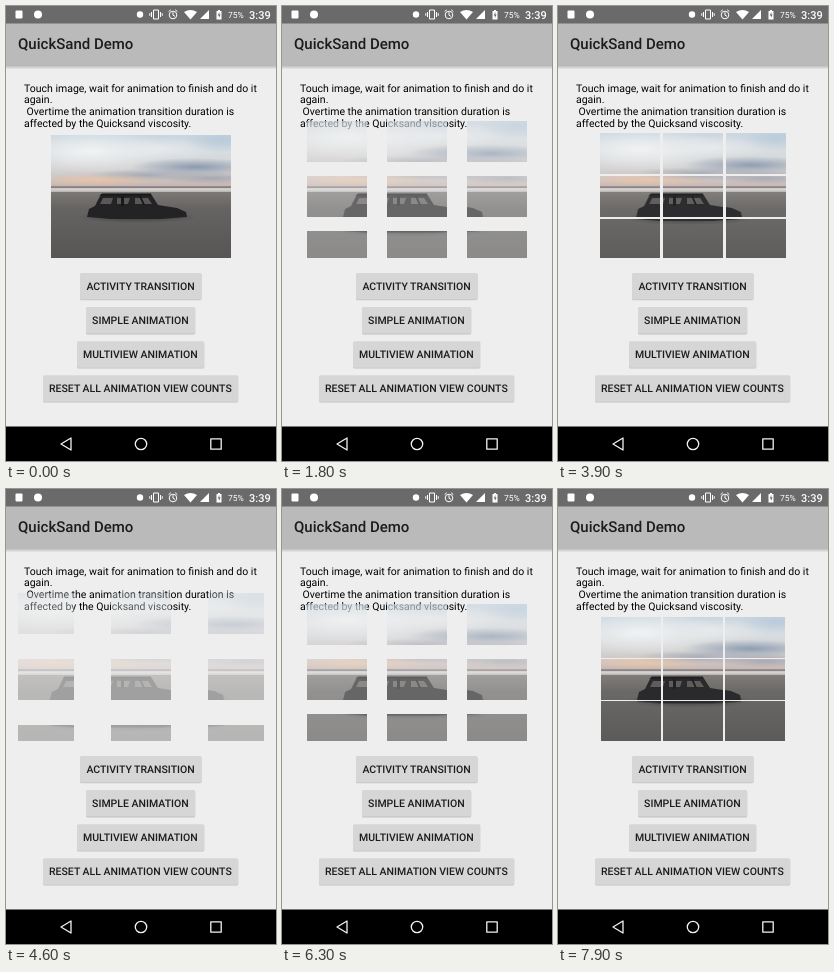
Recreate the animation shown at these times as an HTML page with a canvas. Size 270x455 px, loop 8000 ms.

```html
<!DOCTYPE html>
<html lang="en">
<head>
<meta charset="utf-8">
<title>QuickSand Demo</title>
<style>
html, body { margin: 0; width: 100%; height: 100%; overflow: hidden; background: #eee; }
svg, canvas { position: absolute; display: block; }
svg { left: 0; top: 0; }
canvas { left: 12px; top: 80px; }
text { font-family: Roboto, "Noto Sans", sans-serif; text-rendering: geometricPrecision; }
.title { font-size: 15px; font-weight: 500; fill: #1c1c1c; }
.body { font-size: 10.5px; fill: #000; white-space: pre; }
.btn { font-size: 10.5px; font-weight: 500; fill: #1c1c1c; text-anchor: middle; }
</style>
</head>
<body>
<svg width="270" height="455" viewBox="0 0 270 455">
  <defs>
    <linearGradient id="shade" x1="0" y1="0" x2="0" y2="1">
      <stop offset="0" stop-color="#000" stop-opacity=".25"/>
      <stop offset="1" stop-color="#000" stop-opacity="0"/>
    </linearGradient>
  </defs>
  <rect width="270" height="455" fill="#eee"/>
  <rect y="17" width="270" height="42" fill="#bababa"/>
  <rect y="59" width="270" height="4.500" fill="url(#shade)"/>
  <rect width="270" height="17.500" fill="#6a6a6a"/>

  <g id="status" fill="#fff">
    <rect x="9.500" y="4.500" width="7" height="8" rx="1"/>
    <circle cx="32" cy="8.500" r="4"/>
    <circle cx="134" cy="8.500" r="3.200"/>
    <path d="M147.500 4h5v9h-5z M145.500 6v5 M154.500 6v5 M143.800 7.200v2.600 M156.200 7.200v2.600" fill="none" stroke="#fff"/>
    <path d="M167 6.200v3l2 1.200 M162.600 5.600l2.200-1.900 M171.400 5.600l-2.200-1.900" fill="none" stroke="#fff"/>
    <circle cx="167" cy="9" r="3.800" fill="none" stroke="#fff"/>
    <path d="M178 6q6.500-4 13 0l-6.500 7.500z"/>
    <path d="M194 13h9V4z"/>
    <path d="M210.500 5h1.500v-1h2v1h1.500v8.500h-5z"/>
    <path d="M213.400 6l-1.700 3.500h1.200v2.500l1.700-3.500h-1.200z" fill="#6a6a6a"/>
    <text x="222" y="12" font-size="8.500">75%</text>
    <text x="243" y="12.700" font-size="11" font-weight="500">3:39</text>
  </g>

  <text class="title" x="12" y="43.200">QuickSand Demo</text>
  <g id="copy"></g>
  <g id="buttons"></g>

  <rect y="420.500" width="270" height="34.500"/>
  <g fill="none" stroke="#f2f2f2" stroke-width="1.300" stroke-linejoin="round">
    <path d="M55 438l10-6v12z"/>
    <circle cx="135" cy="438" r="5.700"/>
    <rect x="204.800" y="432.800" width="10.400" height="10.400"/>
  </g>
</svg>
<canvas id="stage" width="246" height="172"></canvas>

<script>
const LOOP = 8000, HOLD = 60;
const W = 180, H = 123, TW = W / 3, TH = H / 3;
const LEFT = 45 - 12, TOP = 129 - 80;
// start and duration of each burst; every one is shorter than the last
const BURSTS = [[1059, 1900], [3678, 1600], [5754, 1400], [7754, 1250]];

const byId = id => document.getElementById(id);

function add(parent, name, attrs, text = '') {
  const el = document.createElementNS('http://www.w3.org/2000/svg', name);
  for (const key in attrs) el.setAttribute(key, attrs[key]);
  el.textContent = text;
  parent.append(el);
}

[
  'Touch image, wait for animation to finish and do it',
  'again.',
  ' Overtime the animation transition duration is',
  'affected by the Quicksand viscosity.'
].forEach((line, i) =>
  add(byId('copy'), 'text', { class: 'body', x: 18, y: 85.6 + i * 11.8 }, line));

[
  ['ACTIVITY TRANSITION', 74, 121.5],
  ['SIMPLE ANIMATION', 80, 109.2],
  ['MULTIVIEW ANIMATION', 71, 127.2],
  ['RESET ALL ANIMATION VIEW COUNTS', 37, 195.2]
].forEach(([label, x, width], i) => {
  const y = 267 + i * 34.1, group = byId('buttons');
  const box = { x, width, height: 26.5, rx: 1.5 };
  add(group, 'rect', { ...box, y: y + .8, fill: '#c2c2c2' });
  add(group, 'rect', { ...box, y, fill: '#d6d6d6' });
  add(group, 'text', { class: 'btn', x: x + width / 2 - .2, y: y + 17 }, label);
});

function paintPhoto() {
  const photo = document.createElement('canvas');
  photo.width = W;
  photo.height = H;
  const c = photo.getContext('2d');

  function band(y0, y1, ...colors) {
    const fill = c.createLinearGradient(0, y0, 0, y1);
    colors.forEach((color, i) => fill.addColorStop(i / (colors.length - 1), color));
    c.fillStyle = fill;
    c.fillRect(0, y0, W, y1 - y0);
  }

  function cloud(x, y, rx, ry, rgb, alpha) {
    c.save();
    c.translate(x, y);
    c.scale(rx, ry);
    const fill = c.createRadialGradient(0, 0, 0, 0, 0, 1);
    fill.addColorStop(0, `rgba(${rgb},${alpha})`);
    fill.addColorStop(1, `rgba(${rgb},0)`);
    c.fillStyle = fill;
    c.fillRect(-1, -1, 2, 2);
    c.restore();
  }

  function shape(color, path) {
    c.fillStyle = color;
    c.fill(new Path2D(path));
  }

  band(0, 53, '#c9d6e0', '#d6dce0', '#d3d2d2', '#c4b3ae');
  cloud(40, 16, 80, 22, '244,245,245', .9);
  cloud(110, 14, 55, 12, '238,238,240', .7);
  cloud(172, 5, 40, 12, '176,196,216', .7);
  cloud(145, 32, 65, 9, '126,144,168', .85);
  cloud(95, 40, 60, 6, '150,158,174', .7);
  cloud(160, 43, 50, 6, '140,148,164', .6);
  cloud(45, 45, 65, 6, '240,196,160', .75);
  band(51, 53.5, '#a08f8c', '#77757a');
  band(53.5, 57, '#e2dedc', '#b5b1ae');
  band(57, H, '#7b7875', '#666462', '#605f5d', '#5b5a58', '#575655');
  cloud(86, 82, 60, 6, '38,37,36', .6);

  shape('#232325', 'M36 82L38 74 44 71 48 63 50 59.500 100 59 107 70 126 73 135 77 136 82 110 84 60 84Z');
  shape('#5a5856', 'M52 63H62L60 69H49Z M66 63H79L77 69H66Z M84 63H97L101 69H84Z');
  shape('#19191a', 'M48 61L51 58.500H100V60.500H50Z M70 61h3v10h-3z M88 61l2 0 4 9-2 0z');
  return photo;
}

const photo = paintPhoto();
const ctx = byId('stage').getContext('2d');

function spread(t) {
  for (const [start, length] of BURSTS) {
    const age = t - start;
    if (age >= 0 && age < length + HOLD)
      return .5 - .5 * Math.cos(Math.PI * Math.min(1, age / length));
  }
  return 0;
}

function draw(t) {
  const p = spread(t);
  ctx.clearRect(0, 0, 246, 172);
  ctx.globalAlpha = 1 - p;
  if (p === 0) return ctx.drawImage(photo, LEFT, TOP);
  for (let row = 0; row < 3; row++)
    for (let col = 0; col < 3; col++) {
      const x = col * TW, y = row * TH;
      ctx.drawImage(photo, x, y, TW, TH,
        LEFT + x + (col - 1) * p * TW, TOP + y + (row - 1) * p * TH, TW, TH);
    }
}

const begin = performance.now();
function tick() {
  draw((performance.now() - begin) % LOOP);
  requestAnimationFrame(tick);
}
tick();
</script>
</body>
</html>
```
